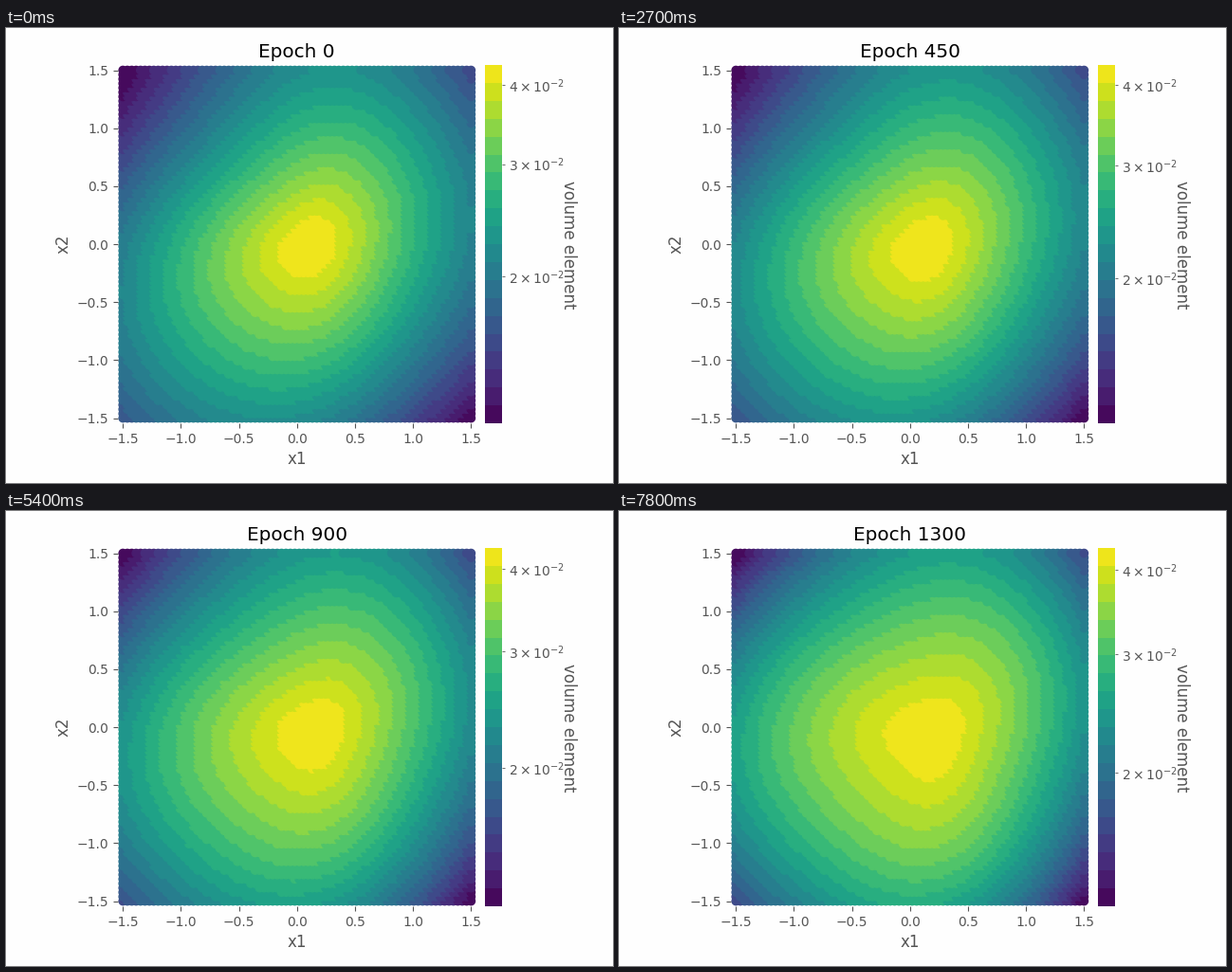
Animation, 640 px wide and 480 px high, one loop 8000 ms. Source, as a matplotlib script:

```python
import numpy as np
import matplotlib.pyplot as plt
from matplotlib.animation import FuncAnimation

WIDTH, HEIGHT, DPI = 640, 480, 100
INTERVAL, FRAMES, HOLD = 100, 80, 3
LAST_STEP = (FRAMES - 1) // HOLD
BANDS, GRID, LIMIT = 20, 80, 1.543
GREY = "#555555"
CORE = 0.21

# Falloff towards E, NE, N, NW, W, SW, S, SE: near the peak and far from it.
NEAR_START = np.array([.518, .394, .434, .517, .369, .330, .381, .513])
NEAR_END = np.array([.362, .252, .285, .261, .190, .221, .205, .331])
FAR_START = np.array([-.020, .007, -.020, -.004, .012, .006, .010, .005])
FAR_END = np.array([.045, .041, .012, .037, .030, .030, .043, .057])
PEAK_START, PEAK_END = np.array([.13, 0.0]), np.array([.20, -.05])

plt.rcParams.update({
    "font.family": "DejaVu Sans", "font.size": 10,
    "xtick.color": GREY, "ytick.color": GREY, "axes.labelcolor": GREY,
})


def mix(start, end, amount):
    return start + (end - start) * amount


def around(values, angle):
    """Smooth periodic interpolation through eight compass values."""
    waves = np.fft.rfft(values) / 8
    result = np.full_like(angle, waves[0].real)
    for k in range(1, 4):
        result += 2 * (waves[k] * np.exp(1j * k * angle)).real
    return result + waves[4].real * np.cos(4 * angle)


def field(x, y, amount):
    """Height on the colour scale, from 0 to 1."""
    px, py = mix(PEAK_START, PEAK_END, amount)
    radius, angle = np.hypot(x - px, y - py), np.arctan2(y - py, x - px)
    near = around(mix(NEAR_START, NEAR_END, amount), angle)
    far = around(mix(FAR_START, FAR_END, amount), angle)
    return 1 - near * (np.hypot(radius, CORE) - CORE) - far * radius ** 3


def pixel_axes(left, top, right, bottom):
    ax = fig.add_axes([left / WIDTH, 1 - bottom / HEIGHT,
                       (right - left) / WIDTH, (bottom - top) / HEIGHT])
    ax.spines[:].set_visible(False)
    return ax


fig = plt.figure(figsize=(WIDTH / DPI, HEIGHT / DPI), dpi=DPI,
                 facecolor="#fefefe")
palette = plt.get_cmap("viridis")((np.arange(BANDS) + 0.5) / BANDS)

ax = pixel_axes(118, 39.3, 495.6, 416.8)
ticks = np.arange(-1.5, 1.6, 0.5)
ax.set(xlim=(-LIMIT, LIMIT), ylim=(-LIMIT, LIMIT),
       xticks=ticks, yticks=ticks)
ax.set_xlabel("x1", fontsize=12)
ax.set_ylabel("x2", fontsize=12)
title = ax.set_title("", fontsize=14.4)

side = np.linspace(-1.5, 1.5, GRID)
xs, ys = (axis.ravel() for axis in np.meshgrid(side, side))
dots = ax.scatter(xs, ys, s=36, clip_on=False)

bar = pixel_axes(505, 39.3, 522.8, 416.8)
bar.imshow(palette[:, None], origin="lower", extent=(0, 1, 0, 1),
           aspect="auto", interpolation="nearest")
bar.set_xticks([])
bar.yaxis.tick_right()
bar.tick_params(axis="y", length=2, width=0.6, pad=3.4)
fig.text(593.5 / WIDTH, 1 - 228.5 / HEIGHT, "volume element", rotation=270,
         fontsize=12, color=GREY, ha="center", va="center")


def draw(frame):
    step = min(frame // HOLD, LAST_STEP)
    time = step / LAST_STEP
    title.set_text(f"Epoch {50 * step}")

    level = np.clip(field(xs, ys, time ** 1.3), 0, 0.999)
    dots.set_color(palette[(level * BANDS).astype(int)])

    shift = np.interp(step, [0, 6, 11, 14, 18, 23, 26],
                      [0, .04, .25, .43, .68, .86, 1])
    low, high = mix(.1623, .2355, shift), mix(1.4565, 1.4608, shift)
    marks = np.array([2, 3, 4])
    bar.set_yticks((np.log(marks) - low) / (high - low),
                   [rf"$\mathdefault{{{m}\times10^{{-2}}}}$" for m in marks])
    return dots, title


animation = FuncAnimation(fig, draw, frames=FRAMES, interval=INTERVAL,
                          repeat=True, repeat_delay=0, blit=False)
plt.show()
```
